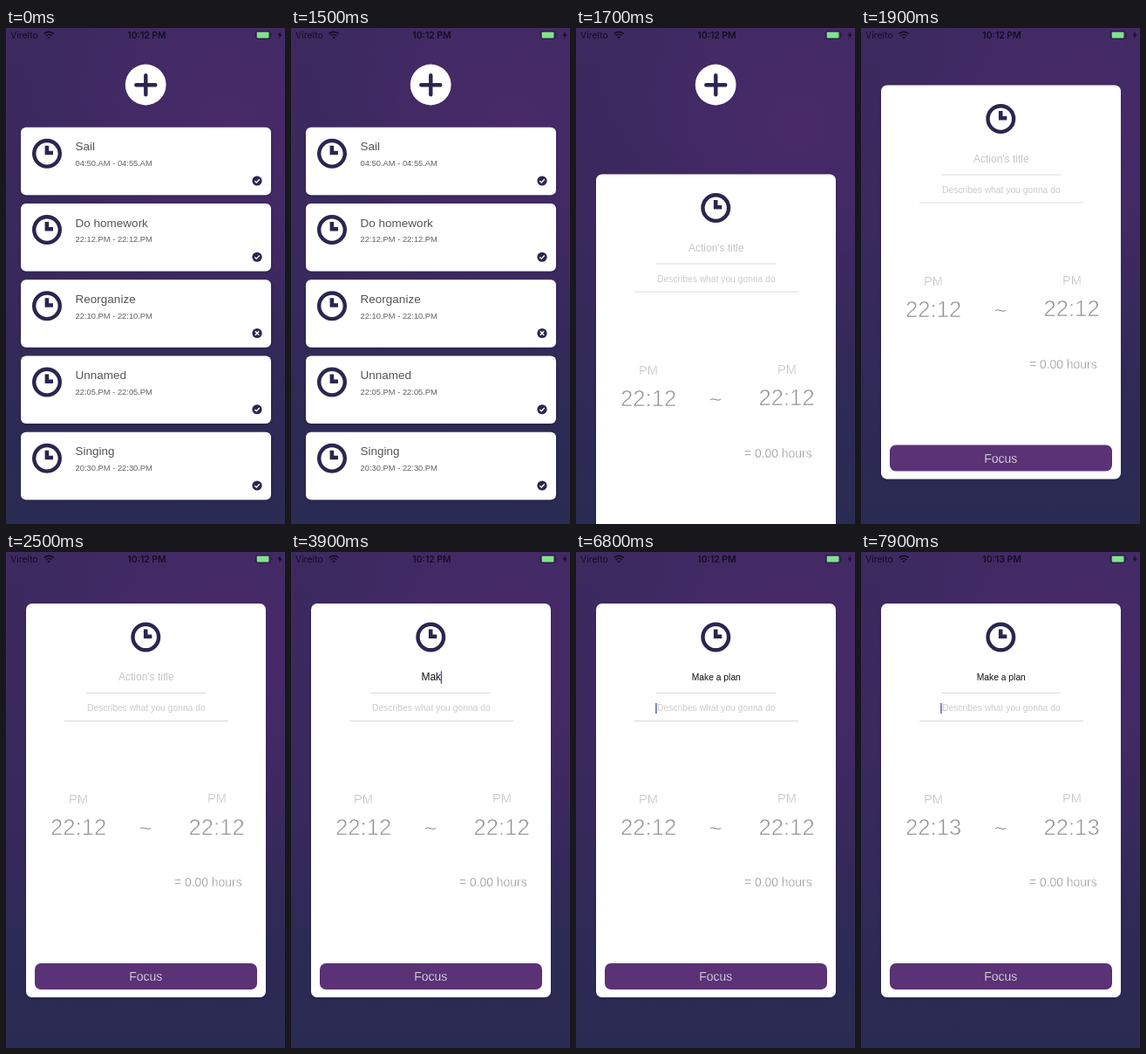
Recreate the animation shown at these times as an HTML page. Size 320 by 568 pixels, loop 8000 ms.

```html
<!DOCTYPE html>
<html lang="en">
<head>
<meta charset="utf-8">
<title>Action planner</title>
<style>
  html, body { margin: 0; width: 100%; height: 100%; overflow: hidden; background: #2b2b53; }
  svg { display: block; width: 320px; height: 568px; }
  text { font-family: "Liberation Sans", Arial, sans-serif; white-space: pre; }
  .status { font-family: Inter, sans-serif; font-size: 10.4px; fill: #140d22; }
  .name { font-size: 13.5px; fill: #555; }
  .span { font-size: 9.35px; fill: #606060; }
  .mid { text-anchor: middle; }
  .hint { fill: #cbcbcb; }
  .thin { fill: #929292; stroke: #fff; stroke-width: .65px; }
  .rule { stroke: #dadada; stroke-width: 1; }
  .caret { fill: #4b559c; }
</style>
</head>
<body>
<svg viewBox="0 0 320 568">
  <defs>
    <linearGradient id="sky" x1="0" y1="0" x2="0" y2="1">
      <stop offset="0" stop-color="#3d2a60"/>
      <stop offset=".5" stop-color="#38295c"/>
      <stop offset=".8" stop-color="#2d2a55"/>
      <stop offset="1" stop-color="#2a2b52"/>
    </linearGradient>
    <radialGradient id="glow" gradientUnits="userSpaceOnUse" cx="255" cy="110" r="270">
      <stop offset="0" stop-color="#4b2a6b" stop-opacity=".85"/>
      <stop offset=".5" stop-color="#462a68" stop-opacity=".55"/>
      <stop offset="1" stop-color="#3a2a60" stop-opacity="0"/>
    </radialGradient>
    <filter id="shade" x="-10%" y="-10%" width="120%" height="125%">
      <feDropShadow dx="0" dy="1" stdDeviation="1.5" flood-color="#120a28" flood-opacity=".3"/>
    </filter>
    <g id="clock">
      <circle r="14.8" fill="none" stroke="#2a2650" stroke-width="4.4"/>
      <path d="M-2.4-9h4.6v6h4.8v4.4h-9.4z" fill="#2a2650"/>
    </g>
    <g id="done">
      <circle r="5.6" fill="#2a2650"/>
      <path d="M-2.7 .1l1.9 1.9 3.6-3.8" fill="none" stroke="#fff" stroke-width="1.3"/>
    </g>
    <g id="missed">
      <circle r="5.6" fill="#2a2650"/>
      <path d="M-2.2-2.2l4.4 4.4m0-4.4l-4.4 4.4" stroke="#fff" stroke-width="1.5"/>
    </g>
  </defs>

  <rect width="320" height="568" fill="url(#sky)"/>
  <rect width="320" height="568" fill="url(#glow)"/>

  <text class="status" x="5" y="12">Virelto</text>
  <g fill="none" stroke="#140d22" stroke-width="1.6">
    <path d="M43.6 6.6a7.8 7.8 0 0 1 11 0M45.8 8.9a4.7 4.7 0 0 1 6.6 0"/>
    <path d="M49.1 12.4l-1.8-1.9a2.6 2.6 0 0 1 3.6 0z" fill="#140d22" stroke="none"/>
  </g>
  <text class="status mid" id="time" x="161.5" y="12" font-weight="600"></text>
  <rect x="286.3" y="3.5" width="17" height="9" rx="2" fill="none" stroke="#241834" stroke-width=".8"/>
  <rect x="287.8" y="4.7" width="13.6" height="6.7" rx=".8" fill="#7fe58a"/>
  <path d="M304.4 6.6q2 1.4 0 2.8z" fill="#241834"/>
  <path d="M315 3.6l-3.4 5h2.2l-.8 3.8 3.6-5.2h-2.4z" fill="#140d22"/>

  <g id="add">
    <circle cx="160.2" cy="65" r="23.4" fill="#fff"/>
    <path d="M149.3 65.3h22m-11-11v22" stroke="#2a2650" stroke-width="4.4" stroke-linecap="round"/>
  </g>

  <g id="list"></g>

  <g id="form">
    <rect x="23" width="275" height="451" rx="7" fill="#fff" filter="url(#shade)"/>
    <use href="#clock" x="160.3" y="38.5"/>
    <text id="title" class="mid" x="160.8" y="88"></text>
    <path class="rule" d="M92 102.5h137M67 134.5h188"/>
    <text class="hint" x="93" y="123.4" font-size="10.3">Describes what you gonna do</text>
    <rect id="caret" class="caret" width="1.4"/>
    <g class="thin" font-size="14.7" style="stroke-width:.45px; fill:#b4b4b4">
      <text x="72" y="229.2">PM</text>
      <text x="231" y="228.2">PM</text>
    </g>
    <g class="thin" font-size="25.7">
      <text class="clockText" x="51" y="265.2">22:12</text>
      <text x="152.4" y="266">~</text>
      <text class="clockText" x="209.4" y="264.6">22:12</text>
    </g>
    <text x="193" y="324.4" font-size="13.9" class="thin" style="stroke-width:.35px">= 0.00 hours</text>
    <rect x="33" y="412" width="255" height="30" rx="7" fill="#5a3275"/>
    <text class="mid" x="160.2" y="432" font-size="14" fill="#fff" stroke="#5a3275" stroke-width=".3">Focus</text>
  </g>
</svg>
<script>
const $ = id => document.getElementById(id);
const add = $('add'), list = $('list'), form = $('form'), title = $('title'), caret = $('caret');

const tasks = [
  ['Sail', '04:50.AM - 04:55.AM', 'done'],
  ['Do homework', '22:12.PM - 22:12.PM', 'done'],
  ['Reorganize', '22:10.PM - 22:10.PM', 'missed'],
  ['Unnamed', '22:05.PM - 22:05.PM', 'done'],
  ['Singing', '20:30.PM - 22:30.PM', 'done']
];
list.innerHTML = tasks.map(([name, span, mark], i) => `
  <g transform="translate(17 ${113.8 + i * 87.25})">
    <rect width="287" height="77.4" rx="6" fill="#fff" filter="url(#shade)"/>
    <use href="#clock" x="30" y="30"/>
    <text class="name" x="62.6" y="26.6">${name}</text>
    <text class="span" x="62.6" y="44.4">${span}</text>
    <use href="#${mark}" x="271" y="61.2"/>
  </g>`).join('');

const LOOP = 8000, STEP = 100;
const OPEN = 1530, COVER = 1700, FOCUS = 2700, NEXT = 6800, MINUTE = 7200;
const phrase = 'Make a plan';
const keys = [3700, 3800, 3900, 4100, 4500, 4800, 5100, 5600, 5900, 6300, 6500];

// Critically damped spring, from 1 to 0
const spring = ms => { const x = Math.max(0, ms) * 0.0172; return (1 + x) * Math.exp(-x); };

const fade = (ms, span) => Math.min(1, Math.max(0, 1 - ms / span));

// Caret blink, counted from the last key or focus
const blink = ms => { const p = ms % 1000; return p < 500 ? 1 : p < 600 ? 0.5 : 0; };

function putCaret(x, y, h, alpha) {
  caret.setAttribute('x', x);
  caret.setAttribute('y', y);
  caret.setAttribute('height', h);
  caret.setAttribute('opacity', alpha);
}

function draw(t) {
  list.setAttribute('opacity', fade(t - OPEN, 150));
  add.setAttribute('opacity', fade(t - COVER, 180));
  form.setAttribute('transform', `translate(0 ${59 + 515 * spring(t - OPEN)})`);
  form.setAttribute('visibility', t > OPEN ? 'visible' : 'hidden');

  const count = keys.filter(k => k <= t).length;
  const editing = t < NEXT;
  title.textContent = count ? phrase.slice(0, count) : "Action's title";
  title.setAttribute('fill', count ? '#111' : '#c6c6c6');
  title.setAttribute('font-size', editing ? 12 : 10.3);

  if (t < FOCUS) putCaret(0, 0, 0, 0);
  else if (editing) {
    const half = title.getComputedTextLength() / 2;
    const since = t - (count ? keys[count - 1] : FOCUS);
    putCaret(count ? 160.4 + half : 159 - half, 77.4, 14.4, blink(since));
  } else putCaret(91.2, 114, 12, blink(t - NEXT));

  const minute = t < MINUTE ? 12 : 13;
  $('time').textContent = `10:${minute} PM`;
  document.querySelectorAll('.clockText').forEach(e => e.textContent = `22:${minute}`);
}

const start = performance.now();
function tick() {
  const t = (performance.now() - start) % LOOP;
  draw(Math.floor(t / STEP) * STEP);
  requestAnimationFrame(tick);
}
tick();
</script>
</body>
</html>
```
